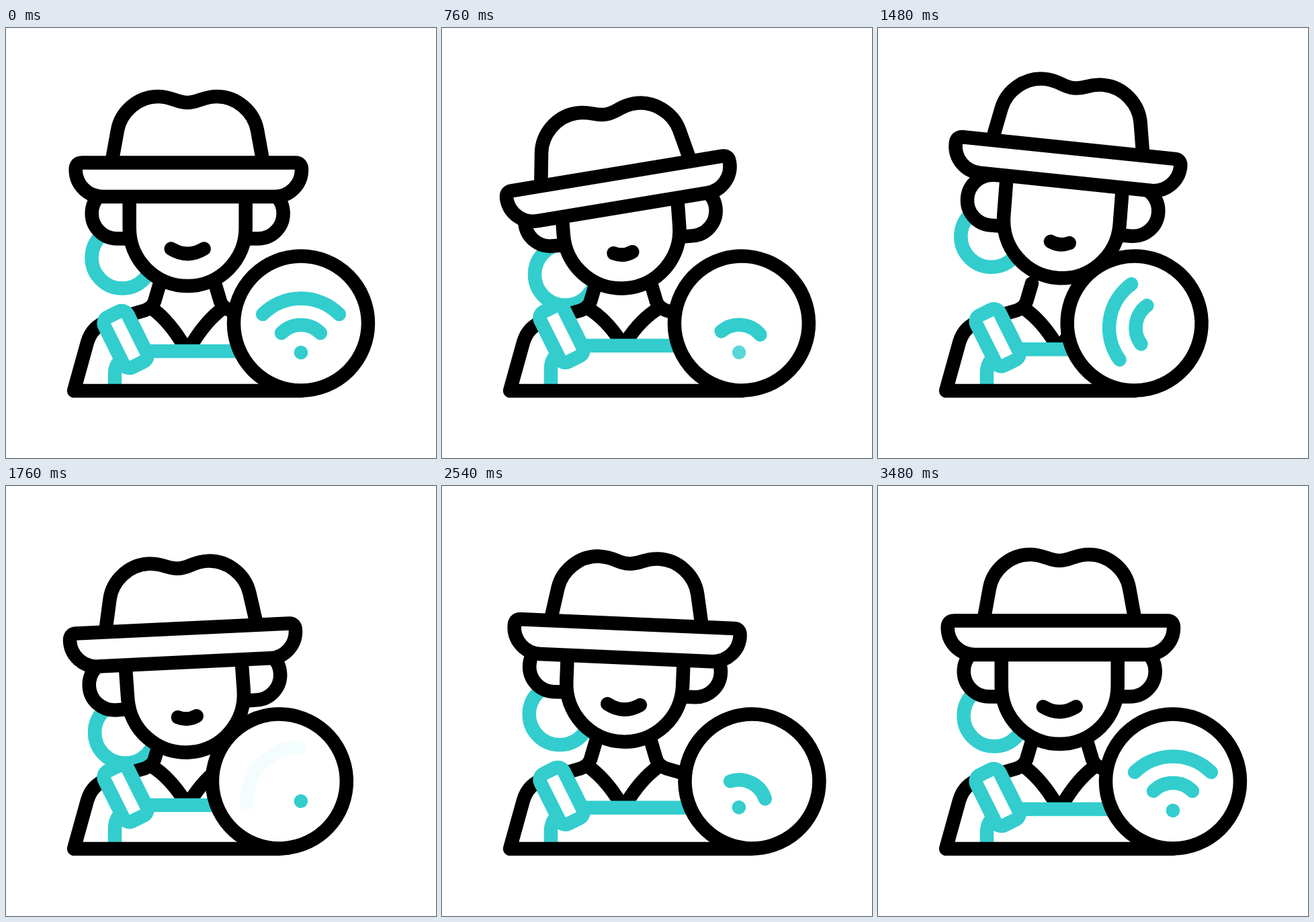
An HTML page with a canvas for the animation above (3.6 s loop, 640 by 640 pixels).

```html
<!DOCTYPE html>
<html lang="en">
<head>
<meta charset="utf-8">
<title>Connected farmer</title>
<style>
html, body { margin: 0; width: 100%; height: 100%; overflow: hidden; background: #fff; }
canvas { display: block; width: 640px; height: 640px; }
</style>
</head>
<body>
<canvas id="stage" width="640" height="640"></canvas>
<script>
const ctx = document.getElementById('stage').getContext('2d');
const LOOP = 3600, BLACK = '#000', TEAL = '#33cdcd', WHITE = '#fff', LINE = 20.5;

const clamp = (v, low = 0, high = 1) => Math.min(high, Math.max(low, v));
const ease = u => (1 - Math.cos(Math.PI * u)) / 2;

// Leaves rest on the first beat, visits one offset per beat, and is back on the last.
function swing(beats, rest, ...offsets) {
  const stops = [0, ...offsets, 0];
  return t => {
    let value = rest;
    for (let i = 1; i < beats.length; i++) {
      const u = clamp((t - beats[i - 1]) / (beats[i] - beats[i - 1]));
      value += (stops[i] - stops[i - 1]) * ease(u);
    }
    return value;
  };
}

// Nod: down, up, hold, down, settle. Loose parts follow the first nod late.
const NOD = [0, 560, 1240, 1420, 1840, 2400, 2850];
const LOOSE = [0, 660, 1240, 1420, 1840, 2400, 2850];
const TILT = [0, 660, 1240, 1420, 1960, 2600, 3050];
const ROLL = [0, 500, 1341, 2415, 3050, 3500];

const face = {
  x: swing(NOD, 270.2, -4.9, 3.6, 3.6, -3.3, 2),
  y: swing(NOD, 297.5, 7.7, -13.2, -13.2, 14.9, -4.3),
  turn: swing(NOD, 0, -6.4, 4.9, 4.9, -4.9, 2.8)
};
const hat = {
  x: swing(LOOSE, 271.8, -11.5, 12.3, 12.3, -10.8, 4.9),
  y: swing(LOOSE, 211, 19, -24, -24, 14.8, 5.9),
  turn: swing(TILT, 0, -10.6, 6.3, 6.3, -6.6, 2.7)
};
const earring = {
  x: swing(LOOSE, 173, 11.7, -4.8, -4.8, 5.4, 2.9),
  y: swing(LOOSE, 342, 29.7, -35, -35, 30.6, -2.9)
};
const badge = {
  x: swing(ROLL, 439, 26, -61, 26, -11),
  turn: swing(ROLL, 0, 30.5, -86, 30.5, -9)
};
const smile = swing([0, 500, 1760, 2600], 24.5, -10.5, -10.5);
const lift = swing([0, 620, 1260, 2060, 2800], 0, -9, -1.5, -8);

// The signal pulses outward, one step later per part, and stays lit after three pulses.
const PULSE = { start: 460, step: 170, period: 600, lit: 285, fade: 80, count: 3 };

function glow(t, part) {
  const { start, step, period, lit, fade, count } = PULSE;
  const since = t - start - step * part, end = period * count;
  let phase = since % period;
  if (since < 0) phase = Math.max(since + period, fade);
  if (since >= end) phase = Math.min(since - end, lit);
  return Math.min(clamp(phase / fade), clamp(1 - (phase - lit) / fade));
}

const shape = d => new Path2D(d);
const crown = shape('M158 196 L166 152 C171 125 196 102 226 102 C248 102 253 111 270 111 C287 111 292 102 314 102 C344 102 369 125 374 152 L382 196');
const brim = shape('M113 200.5 H430.5 Q440 200.5 440 211 A40 40 0 0 1 400 251 H144 A40 40 0 0 1 103.7 211 Q103.7 200.5 113 200.5 Z');
const head = shape('M-86.5 -70 V0 A86.5 86.5 0 0 0 86.5 0 V-70');
const ear = shape('M-86.5 16 H-105 A37.5 37.5 0 0 1 -105 -59 H-86.5');
const neck = shape('M229 380 L221 407 Q218 416 206 420.5 L152 436');
const halfTorso = shape('M229 380 L221 407 Q218 416 206 420.5 L152 436 Q128 444 121 468 L101 540 H271 V380 Z');

function draw(path, color, fill) {
  if (fill) {
    ctx.fillStyle = fill;
    ctx.fill(path);
  }
  ctx.strokeStyle = color;
  ctx.stroke(path);
}

function at(x, y, degrees, paint) {
  ctx.save();
  ctx.translate(x, y);
  ctx.rotate(degrees * Math.PI / 180);
  paint();
  ctx.restore();
}

function arc(x, y, r, from = 0, to = 2 * Math.PI) {
  const path = new Path2D();
  path.arc(x, y, r, from, to);
  return path;
}

function mirrored(axis, paint) {
  paint();
  ctx.save();
  ctx.translate(2 * axis, 0);
  ctx.scale(-1, 1);
  paint();
  ctx.restore();
}

function drawBody(t) {
  const rise = lift(t);
  ctx.fillStyle = WHITE;
  mirrored(270, () => ctx.fill(halfTorso));
  mirrored(270, () => {
    draw(shape(`M217 417 Q244 ${437 + rise / 2} 266 ${475 + rise}`), BLACK);
    draw(neck, BLACK);
  });
  ctx.lineCap = 'butt';
  draw(shape(`M205 ${481 + rise} H400`), TEAL);
  draw(shape(`M162 535 V${516 + rise} Q162 ${502 + rise} 171 ${494 + rise}`), TEAL);
  ctx.lineCap = 'round';
  at(178, 463.5 + rise, -26.5, () => {
    const strap = new Path2D();
    strap.roundRect(-19.3, -41.5, 38.6, 83, 10);
    draw(strap, TEAL, WHITE);
  });
  draw(shape(`M152 436 Q128 444 121 468 L101 540 H${badge.x(t)}`), BLACK);
  at(178, 463.5 + rise, -26.5, () => {
    const strap = new Path2D();
    strap.roundRect(-19.3, -41.5, 38.6, 83, 10);
    draw(strap, TEAL, WHITE);
  });
}

function drawHead(t) {
  at(face.x(t), face.y(t), face.turn(t), () => {
    mirrored(0, () => draw(ear, BLACK, WHITE));
    draw(head, BLACK, WHITE);
    const w = smile(t), shut = 24.5 - w, y = 31 + shut * 0.22, dip = 7.5 - shut * 0.4;
    draw(shape(`M${-w} ${y} Q0 ${y + 2 * dip} ${w} ${y}`), BLACK);
  });
  at(hat.x(t), hat.y(t), hat.turn(t), () => {
    ctx.translate(-271.8, -211);
    draw(crown, BLACK, WHITE);
    draw(brim, BLACK, WHITE);
  });
}

function drawBadge(t) {
  at(badge.x(t), 439.5, badge.turn(t), () => {
    draw(arc(0, 0, 100), BLACK, WHITE);
    ctx.fillStyle = TEAL;
    ctx.globalAlpha = glow(t, 0);
    ctx.fill(arc(0, 43.5, 10.3));
    for (const part of [1, 2]) {
      ctx.globalAlpha = glow(t, part);
      draw(arc(0, 43.5, 1.5 + 39.5 * part, -0.75 * Math.PI, -0.25 * Math.PI), TEAL);
    }
  });
}

function render() {
  const t = performance.now() % LOOP;
  ctx.fillStyle = WHITE;
  ctx.fillRect(0, 0, 640, 640);
  ctx.lineWidth = LINE;
  ctx.lineCap = ctx.lineJoin = 'round';
  draw(arc(earring.x(t), earring.y(t), 45.5), TEAL);
  drawBody(t);
  drawHead(t);
  drawBadge(t);
  requestAnimationFrame(render);
}
render();
</script>
</body>
</html>
```
